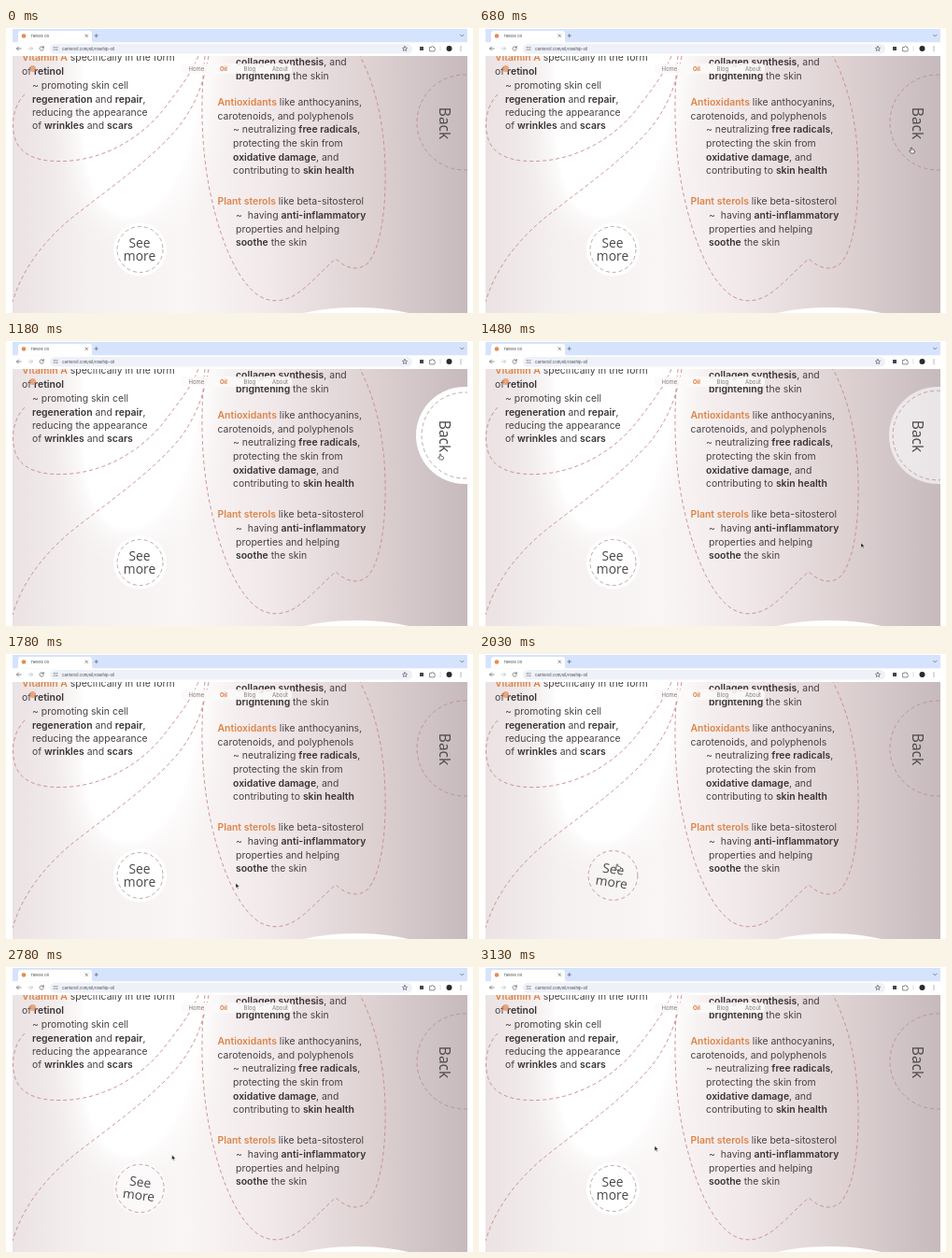
Animation, 500 px wide and 305 px high, one loop 3180 ms. Source, as an HTML page:

```html
<!DOCTYPE html>
<html lang="en">
<head>
<meta charset="utf-8">
<title>Oil page</title>
<style>
html, body { margin: 0; width: 100%; height: 100%; overflow: hidden; background: #fff; }
svg { display: block; width: 500px; height: 305px; }
text { font-family: Inter, "Open Sans", sans-serif; white-space: pre; }
.copy text { font-size: 10.45px; fill: #484143; }
.copy .b { font-weight: 600; fill: #383234; }
.copy .o { font-weight: 600; fill: #dc8548; }
.nav text { font-size: 6px; fill: #817a79; }
.nav .on { fill: #e0783a; font-weight: 700; }
.dash, .ring { fill: none; stroke-width: .85; stroke-dasharray: 4 3; }
.dash { stroke: #c88386; }
.label text { font-family: "Open Sans", "Noto Sans", sans-serif; fill: #4b4648; text-anchor: middle; }
.ui { fill: none; stroke: #5b5e66; stroke-width: .7; stroke-linecap: round; stroke-linejoin: round; }
.small { font-size: 4.2px; fill: #3c4048; }
</style>
</head>
<body>
<svg viewBox="0 0 500 305">
  <defs>
    <linearGradient id="wash">
      <stop offset="0" stop-color="#ebe2e3"/>
      <stop offset=".16" stop-color="#f5f0f0"/>
      <stop offset=".38" stop-color="#faf6f6"/>
      <stop offset=".57" stop-color="#f1e8e9"/>
      <stop offset=".78" stop-color="#ded2d3"/>
      <stop offset="1" stop-color="#c6babd"/>
    </linearGradient>
    <filter id="soft"><feGaussianBlur stdDeviation="2"/></filter>
    <filter id="glow" x="-50%" y="-50%" width="200%" height="200%"><feGaussianBlur stdDeviation="16"/></filter>
    <clipPath id="page"><rect x="7" y="30" width="487" height="275"/></clipPath>
    <path id="blob" d="M82 10C78 80 78 140 94 176C106 205 136 212 162 190C195 160 210 90 217 10Z"/>
  </defs>

  <g clip-path="url(#page)">
    <rect x="7" y="30" width="487" height="275" fill="url(#wash)"/>
    <use href="#blob" fill="#fff" stroke="#fff" stroke-width="16" filter="url(#glow)"/>
    <use href="#blob" fill="#fff" filter="url(#soft)"/>
    <ellipse cx="375" cy="328" rx="92" ry="29" fill="#fff"/>

    <path class="dash" d="M20 71C9 82 5 100 9 116C14 137 36 145 70 142C112 138 147 114 168 88C184 67 198 50 206 30"/>
    <path class="dash" d="M217 30C211 62 201 86 183 108C150 146 104 176 67 206C37 232 17 260 7 293"/>
    <path class="dash" d="M213 30C208 75 209 125 217 168C226 215 242 262 266 283C281 296 300 294 316 281C330 270 341 257 353 247C364 257 376 261 387 252C402 236 407 190 406 150C405 105 397 65 379 30"/>

    <g class="label">
      <circle id="seeFill" cx="143.500" cy="237" r="28.500" fill="#fff"/>
      <circle id="seeRing" class="ring" cx="143.500" cy="237"/>
      <g id="seeText" font-size="13.800">
        <text x="143" y="235">See</text>
        <text x="143" y="249">more</text>
      </g>
      <circle id="backFill" cx="491" cy="101" r="52" fill="#fff"/>
      <circle id="backRing" class="ring" cx="491" cy="101"/>
      <text font-size="15.600" transform="translate(464 102) rotate(90)">Back</text>
    </g>

    <g class="copy" id="copy"></g>

    <rect x="188" y="38" width="118" height="11" rx="4" fill="#fcfafa" opacity=".88"/>
    <circle cx="28.500" cy="43.500" r="3.500" fill="#e58a52" opacity=".7"/>
    <g class="nav">
      <text x="195.500" y="45.500">Home</text>
      <text x="229" y="45.500" class="on">Oil</text>
      <text x="254.500" y="45.500">Blog</text>
      <text x="285" y="45.500">About</text>
    </g>
  </g>

  <rect x="7" y="1" width="487" height="14.500" fill="#d6e3fc"/>
  <path d="M11 15.500Q13 15.500 13 13V6Q13 3 16 3H89Q92 3 92 6V13Q92 15.500 94 15.500Z" fill="#fff"/>
  <rect x="7" y="15.500" width="487" height="14" fill="#fff"/>
  <rect x="47" y="17" width="388" height="10.500" rx="5.200" fill="#eef1f8"/>
  <circle cx="19" cy="8.500" r="2.300" fill="#e58a52"/>
  <text class="small" style="font-size:4px" x="26.500" y="9.700">Tavelle Oil</text>
  <text class="small" x="60" y="23.500">carrieroil.com/oil/rosehip-oil</text>
  <g class="ui">
    <path d="M85 7l2.600 2.600m0-2.600l-2.600 2.600M95 8.200h3.400m-1.700-1.700v3.400"/>
    <path d="M486.500 7.200l1.800 1.800l1.800-1.800"/>
    <path d="M16 22h-4.500m2-2l-2 2l2 2"/>
    <path d="M24 22h4.500m-2-2l2 2l-2 2" stroke="#b5b8be"/>
    <path d="M40.200 21a2.200 2.200 0 1 0 .1 1.800m0-3.300v1.700h-1.700"/>
    <path d="M51 20.800h2m1.200 0h1M51 23.200h1m1.200 0h2"/>
    <path d="M427 19.600l.8 1.600l1.800.2l-1.300 1.200l.4 1.800l-1.700-.9l-1.700.9l.4-1.800l-1.300-1.200l1.800-.2z"/>
    <path d="M454 20.500h1.500a1 1 0 0 1 2 0h1.300v1.500a1 1 0 0 1 0 1.900v1h-4.800z"/>
    <path d="M465 19.500v5" stroke="#c3d3f3"/>
  </g>
  <rect x="443" y="20" width="4" height="4" fill="#44474d"/>
  <circle cx="474.500" cy="22" r="3" fill="#292b2c"/>
  <g fill="#5b5e66"><circle cx="487" cy="20" r=".6"/><circle cx="487" cy="22" r=".6"/><circle cx="487" cy="24" r=".6"/></g>

  <g id="cursor">
    <path id="arrow" d="M0 0V5.200L1.300 4.100L2.200 6L3.100 5.600L2.200 3.800H3.900Z" fill="#171717" stroke="#fff" stroke-width=".45"/>
    <path id="hand" d="M-.7 .2Q0-.7.700.2V2.100L3 2.700Q3.700 3 3.500 3.900L3 6H-.5L-2.300 3.700Q-2.200 2.800-1.300 3.200L-.7 3.700Z" fill="#fff" stroke="#2b2b2b" stroke-width=".65" stroke-linejoin="round"/>
  </g>
</svg>

<script>
const LOOP = 3180;
const $ = id => document.getElementById(id);

// Each line: x, baseline, copy; *bold* and _orange_ runs
const lines = [
  [17, 35, "_Vitamin A_ specifically in the form"],
  [17, 50, "of *retinol*"],
  [28, 65, "~ promoting skin cell"],
  [28, 79.5, "*regeneration* and *repair*,"],
  [28, 94, "reducing the appearance"],
  [28, 108.3, "of *wrinkles* and *scars*"],
  [246, 40, "*collagen synthesis*, and"],
  [246, 54.5, "*brightening* the skin"],
  [226.5, 83, "_Antioxidants_ like anthocyanins,"],
  [226.5, 97.5, "carotenoids, and polyphenols"],
  [243, 112, "~ neutralizing *free radicals*,"],
  [243, 127, "protecting the skin from"],
  [243, 141.5, "*oxidative damage*, and"],
  [243, 156, "contributing to *skin health*"],
  [226.5, 189, "_Plant sterols_ like beta-sitosterol"],
  [246, 204, "~  having *anti-inflammatory*"],
  [246, 218.5, "properties and helping"],
  [246, 233, "*soothe* the skin"]
];

$("copy").innerHTML = lines.map(([x, y, s]) => {
  const runs = s.replace(/\*(.+?)\*/g, '<tspan class="b">$1</tspan>')
                .replace(/_(.+?)_/g, '<tspan class="o">$1</tspan>');
  return `<text x="${x}" y="${y}">${runs}</text>`;
}).join("");

// Pointer path: time, x, y
const path = [
  [300, 432, 308], [580, 462, 140], [680, 463, 128], [1180, 465, 121],
  [1280, 452, 150], [1480, 409, 216], [1700, 300, 250], [1900, 165, 238],
  [2030, 148, 225], [2280, 152, 223], [2530, 160, 217], [2700, 172, 206],
  [2900, 186, 194], [3180, 188.5, 191]
];

const mix = (a, b, k) => a + (b - a) * k;
const ramp = (t, a, b) => {
  const k = Math.min(1, Math.max(0, (t - a) / (b - a)));
  return k * k * (3 - 2 * k);
};
const pulse = (t, a, b, c, d) => ramp(t, a, b) - ramp(t, c, d);

function pointerAt(t) {
  const i = path.findIndex(p => p[0] > t);
  const [t0, x0, y0] = path[i - 1], [t1, x1, y1] = path[i];
  const k = (t - t0) / (t1 - t0);
  return [mix(x0, x1, k), mix(y0, y1, k)];
}

// filled: 0 is a bare pink ring, 1 a white disc with a grey inner ring
function disc(name, filled, outer, inner) {
  $(name + "Fill").setAttribute("opacity", filled);
  const ring = $(name + "Ring");
  ring.setAttribute("r", mix(outer, inner, filled));
  ring.setAttribute("stroke", `rgb(${mix(192, 172, filled)},${mix(138, 158, filled)},${mix(142, 160, filled)})`);
}

function draw(t) {
  disc("back", pulse(t, 680, 1080, 1270, 1780), 51, 46);
  disc("see", 1 - pulse(t, 1850, 2060, 2650, 2950), 26.5, 24.5);
  const tilt = 14 * pulse(t, 1820, 2200, 2620, 2950);
  $("seeText").setAttribute("transform", `rotate(${tilt} 143 237)`);

  const shown = t >= path[0][0];
  $("cursor").style.display = shown ? "" : "none";
  if (!shown) return;
  $("cursor").setAttribute("transform", `translate(${pointerAt(t)})`);
  const over = (t >= 580 && t < 1280) || (t >= 1880 && t < 2640);
  $("hand").style.display = over ? "" : "none";
  $("arrow").style.display = over ? "none" : "";
}

// Each picture holds for a short step
const held = t => t < 100 ? 0 : t < 130 ? 100 : 130 + 50 * Math.floor((t - 130) / 50);

const start = performance.now();
function tick() {
  draw(held((performance.now() - start) % LOOP));
  requestAnimationFrame(tick);
}
tick();
</script>
</body>
</html>
```
